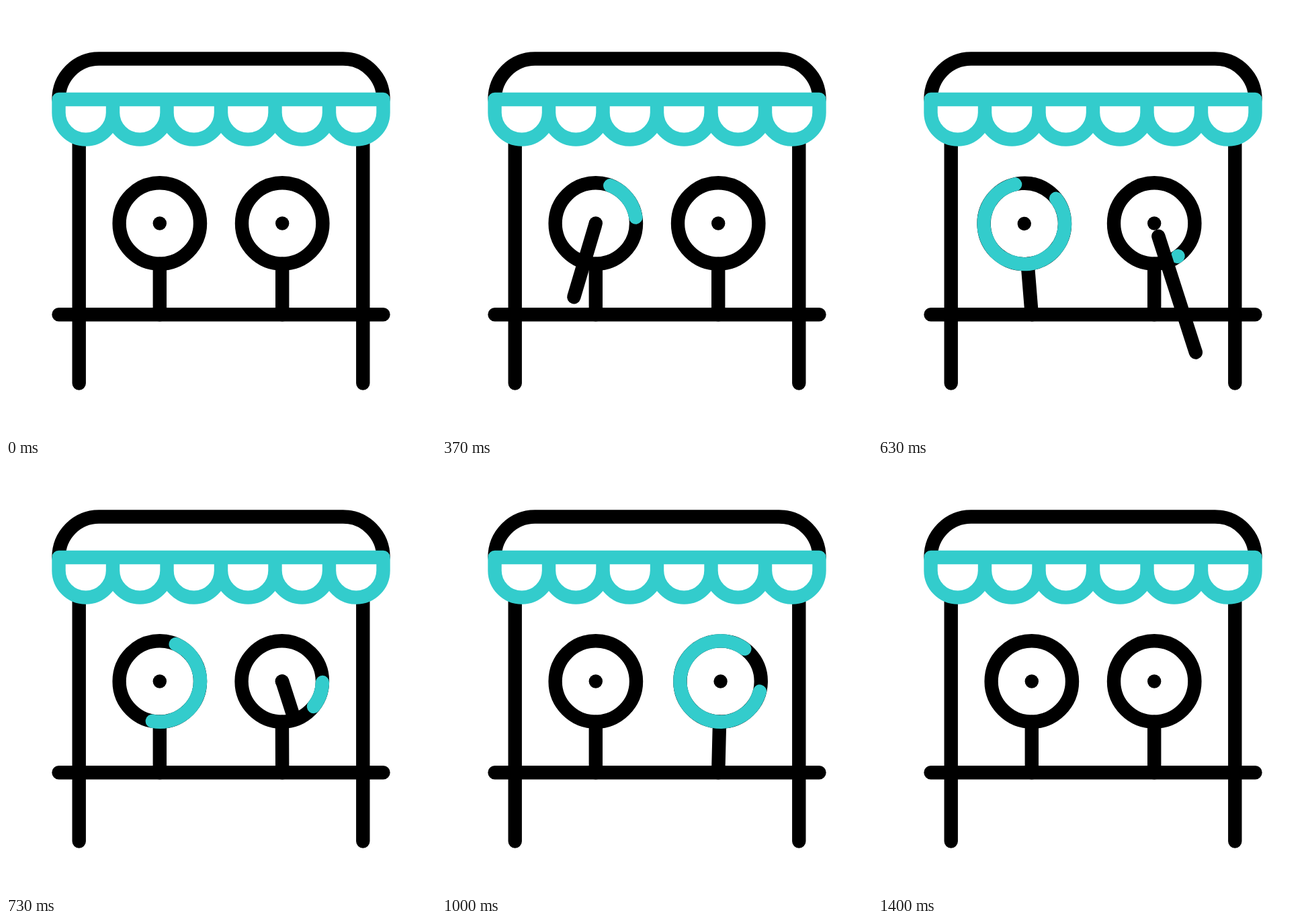
These frames come from a looping animation (640x640 px, 1.67 s). An HTML page:

```html
<!DOCTYPE html>
<html lang="en">
<head>
<meta charset="utf-8">
<title>Shooting stall</title>
<style>
  html, body { margin: 0; width: 100%; height: 100%; overflow: hidden; background: #fff; }
  svg { display: block; width: 100vw; height: 100vh; }
  .ink { fill: none; stroke: #000; stroke-width: 20.4; stroke-linecap: round; stroke-linejoin: round; }
  .teal { stroke: #33cccc; }
  .dot { fill: #000; stroke: none; }
</style>
</head>
<body>
<svg viewBox="0 0 640 640">
  <g class="ink">
    <path d="M78.5 139A59.8 60.5 0 0 1 138.3 78.5H501.7A59.8 60.5 0 0 1 561.5 139"/>
    <path d="M108.7 199V561.5M531.3 199V561.5M78.5 459.3H561.5"/>
    <path id="awning" class="teal"/>
    <g id="targets"></g>
    <g id="darts"></g>
  </g>
</svg>
<script>
const LOOP = 1670, FPS = 30, FRAMES = 50;
const CY = 323.5, R = 60.2, BASE = 459.3;

// Smooth monotone curve through [time, value] keys, flat at its ends and peaks.
function track(keys) {
  const rise = keys.slice(1).map((q, i) => (q[1] - keys[i][1]) / (q[0] - keys[i][0]));
  const slope = keys.map((_, i) => {
    const a = rise[i - 1] || 0, b = rise[i] || 0;
    return a * b > 0 ? 2 * a * b / (a + b) : 0;
  });
  return t => {
    const last = keys.length - 1;
    if (t <= keys[0][0]) return keys[0][1];
    if (t >= keys[last][0]) return keys[last][1];
    const i = keys.findIndex(q => q[0] > t) - 1;
    const [t0, v0] = keys[i], [t1, v1] = keys[i + 1];
    const w = t1 - t0, u = (t - t0) / w, s = u * u * (3 - 2 * u);
    return v0 + (v1 - v0) * s +
      w * u * (1 - u) * (slope[i] * (1 - u) - slope[i + 1] * u);
  };
}

const head = track([[0, 0], [3, .237], [5, .716], [7, .927], [10, 1]]);
const tail = t => t < 3 ? 0 : Math.min(1, (t - 3) ** 2 / 60);
const tilt = track([[9.67, 0], [13, 7.25], [16.2, -5.9], [18.9, 0]]);
const arcStart = track([[0, 0], [6, 45], [8, 63], [11, 110], [12, 116], [15, 277], [18, 383], [23, 550]]);
const arcEnd = track([[0, 1], [6, 160], [8, 274], [11, 402], [12, 411], [18, 481], [23, 550]]);

const el = (name, parent, attrs) => {
  const e = document.createElementNS("http://www.w3.org/2000/svg", name);
  for (const k in attrs) e.setAttribute(k, attrs[k]);
  return parent.appendChild(e);
};
const byId = id => document.getElementById(id);

let scallops = "M78.5 139H561.5";
for (let i = 0; i < 6; i++) {
  scallops += `M${78.5 + 80.5 * i} 139V158.4a40.25 40.25 0 0 0 80.5 0V139`;
}
byId("awning").setAttribute("d", scallops);

const targets = [
  { x: 228.8, from: [147.6, 597.8], lean: 1, angle: 17.5, dartAt: 2, arcAt: 7 },
  { x: 411.2, from: [495.3, 585.3], lean: -.93, angle: 55, dartAt: 12, arcAt: 19 }
];
for (const g of targets) {
  g.stand = el("g", byId("targets"));
  el("path", g.stand, { d: `M${g.x} ${CY + R}V${BASE}` });
  el("circle", g.stand, { cx: g.x, cy: CY, r: R });
  el("circle", g.stand, { cx: g.x, cy: CY, r: 10.2, class: "dot" });
  g.arc = el("path", g.stand, { class: "teal" });
  g.dart = el("path", byId("darts"));
}

function arcPath(x, a, b) {
  const at = deg => {
    const r = deg * Math.PI / 180;
    return `${x + R * Math.cos(r)} ${CY + R * Math.sin(r)}`;
  };
  return `M${at(a)}A${R} ${R} 0 ${b - a > 180 ? 1 : 0} 1 ${at(b)}`;
}

function draw(ms) {
  const n = Math.min(FRAMES - 1, Math.floor((ms % LOOP + 3.4) * FPS / 1000));
  for (const g of targets) {
    const t = n - g.dartAt, s = n - g.arcAt;
    const on = p => `${g.from[0] + (g.x - g.from[0]) * p} ${g.from[1] + (CY - g.from[1]) * p}`;
    g.stand.setAttribute("transform", `rotate(${tilt(t) * g.lean} ${g.x} ${BASE})`);
    g.dart.setAttribute("d", t > 0 && tail(t) < 1 ? `M${on(tail(t))}L${on(head(t))}` : "");
    g.arc.setAttribute("d", s >= 0 && s < 23
      ? arcPath(g.x, g.angle - arcEnd(s), g.angle - arcStart(s)) : "");
  }
}

const began = performance.now();
function tick() {
  draw(performance.now() - began);
  requestAnimationFrame(tick);
}
draw(0);
requestAnimationFrame(tick);
</script>
</body>
</html>
```
